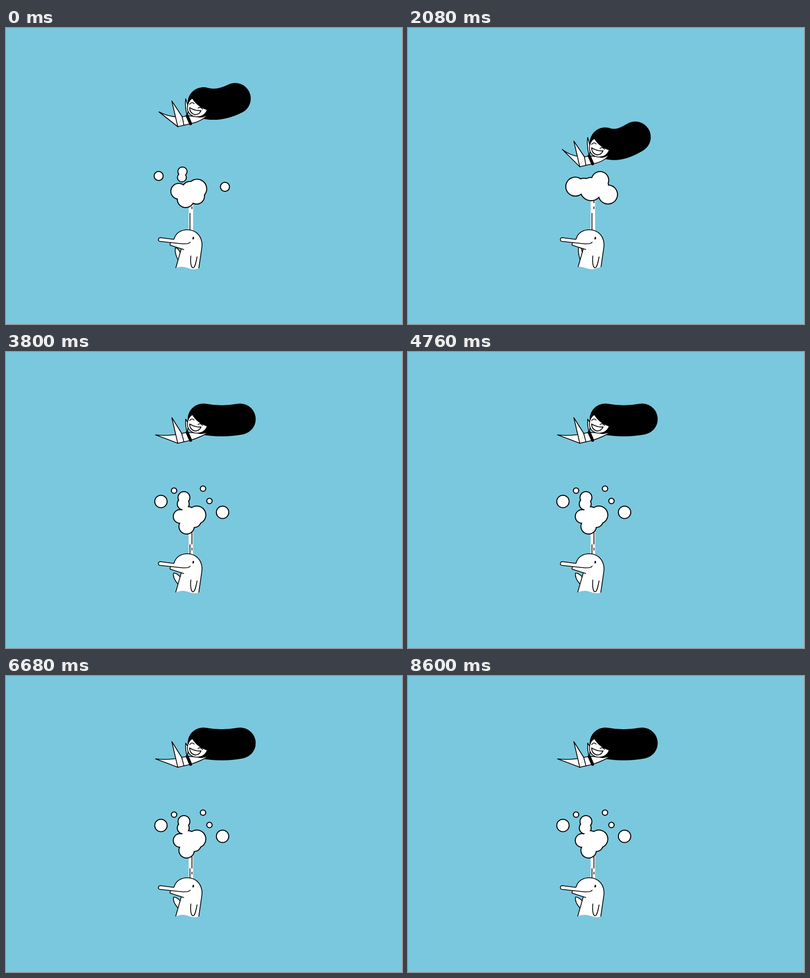
Write an HTML page with a canvas that moves like this. It is 800 px wide and 600 px high and loops after 8640 ms.

```html
<!DOCTYPE html>
<html lang="en">
<head>
<meta charset="utf-8">
<title>Dolphin fountain</title>
<style>
  html, body { margin: 0; width: 100%; height: 100%; overflow: hidden; background: #7ac8de; }
  canvas { display: block; }
</style>
</head>
<body>
<canvas id="stage" width="800" height="600"></canvas>
<script>
const ctx = document.getElementById('stage').getContext('2d');
const STEP = 40, LOOP = 8640, BEAT = 480, TAU = Math.PI * 2;
const SKY = '#7ac8de', INK = '#000', WHITE = '#fff';

// One value per step of the bounce.
const DROP = [15.5, 35, 57, 79, 97, 109, 112, 102, 74.5, 28, -5, 0];
const SWING = [0, -.4, -.6, -.6, -.4, .1, 1.1, 2.3, 3, 2.6, 1.75, 1];

// Points of the swimmer, from trailing up (first) to trailing down (last).
const NAMES = ['foot1', 'shin1', 'hip', 'calf1', 'foot2', 'shin2', 'waist', 'calf2', 'seat',
  'chest', 'rib', 'hand1', 'elbow1', 'hand2', 'elbow2', 'hairEnd', 'hairMid'];
const POSES = [
  [309,154.5, 330,166, 347,184.5, 328,169.5, 335,132.5, 346,149, 356,164.5, 341,158.5, 347,184.5,
   366,162.5, 373,178.5, 363,128, 361,143, 410,158.5, 396,174, 463,127.5, 428,145],
  [302,168, 330,171, 347,185, 324,176, 335,133, 345,149, 355,165, 341,159, 347,185,
   366,163, 373,179, 363,136, 362,150, 414,160, 395,172, 473,136, 436,143],
  [297,181, 322,172, 348,183, 322,183, 318,144, 338,149, 354,163, 334,162, 348,181,
   366,161, 373,177, 359,138, 359,150, 413,168, 396,173, 475,150, 436,148],
  [322,192.5, 331,171, 346,175.5, 335,180, 317,187.5, 326,162, 352,157.5, 332,169, 351,161,
   366,153.5, 374,168.5, 348,143.5, 357,141.5, 395,188.5, 386,172, 432,222.5, 414,179.5]
];

// Foam: x, y, radius when young, when full and when flying off.
const FOAM = [
  [[349,331,16], [327,312,22.5], [313,303,12.5]],
  [[385,341,16], [423,334,22.5], [437.5,325,12.5]],
  [[386,326,19.5], [390,291,15.5], [398,277,5.5]],
  [[363,347,17], [348,295,16], [339.5,281,5.5]],
  [[372,328,17], [405,318,15], [411,302,5.5]],
  [[370,335,16], [368.5,307,20], [359.5,295,12]],
  [[368,338,15], [366,323,21], [358,308,12]],
  [[370,332,18], [370,324,26], [368,330,12]],
  [[378,332,12], [414,304,6], [417,296,-1]]
];

const mix = (a, b, u) => a + (b - a) * u;
const clamp = (v, lo, hi) => Math.max(lo, Math.min(hi, v));

function spline(a, b, c, d, u) {
  return b + .5 * u * (c - a + u * (2 * a - 5 * b + 4 * c - d + u * (3 * (b - c) + d - a)));
}

function poseAt(s) {
  const i = clamp(Math.floor(s), 0, POSES.length - 2), u = s - i;
  const at = k => POSES[clamp(k, 0, POSES.length - 1)];
  const value = j => s < 0
    ? mix(POSES[0][j], POSES[1][j], s)
    : spline(at(i - 1)[j], at(i)[j], at(i + 1)[j], at(i + 2)[j], u);
  return Object.fromEntries(NAMES.map((name, k) => [name, value(2 * k) + ',' + value(2 * k + 1)]));
}

function shape(d, fill, line = 1.6) {
  const p = new Path2D(d);
  if (fill) { ctx.fillStyle = fill; ctx.fill(p); }
  if (line) { ctx.strokeStyle = INK; ctx.lineWidth = line; ctx.stroke(p); }
}

function disc(x, y, r, color) {
  if (r <= 0) return;
  ctx.fillStyle = color;
  ctx.beginPath();
  ctx.arc(x, y, r, 0, TAU);
  ctx.fill();
}

function swimmer(k) {
  const p = poseAt(SWING[k]);
  ctx.save();
  ctx.translate(0, DROP[k]);

  shape(`M398.5,136 Q${p.hairMid} ${p.hairEnd}`, null, 63);
  shape(`M${p.hand1} Q${p.elbow1} ${p.chest} L369,146Z`, WHITE);
  shape(`M${p.foot1} Q${p.shin1} ${p.waist} L${p.hip} Q${p.calf1} ${p.foot1}Z`, WHITE);
  shape(`M${p.waist} L${p.chest} L${p.rib} L${p.hip}`, WHITE);
  shape(`M${p.chest} L${p.rib} Q${p.elbow2} ${p.hand2} Q395,168 386,164Z`, WHITE);
  shape(`M${p.foot2} Q${p.shin2} ${p.waist} L${p.seat} Q${p.calf2} ${p.foot2}Z`, WHITE, 0);
  shape(`M${p.waist} Q${p.shin2} ${p.foot2} Q${p.calf2} ${p.seat}`);

  const [hx, hy] = p.hip.split(',').map(Number);
  const [rx, ry] = p.rib.split(',').map(Number);
  shape(`M${p.waist} L${mix(hx, rx, .48)},${mix(hy, ry, .48)}`);
  shape(`M${p.chest} L${p.rib}`, null, 6);

  shape('M376.5,126.5 Q367,133 366.5,145 C366,157 375,164.5 386,164.5'
    + ' C396,164.5 404,159 406.5,150 Q387,144 376.5,126.5Z', WHITE);
  shape('M371,139 Q376,133 380,138 M388,147 Q393,143 397,149');
  shape('M371,146 Q383,153 394,152 Q390,161 381,160 Q371,157 371,146Z', WHITE, 1.8);
  ctx.restore();
}

function dashes(x, top, length, period) {
  ctx.fillStyle = INK;
  for (let y = top % period - period; y < 412; y += period) {
    const from = Math.max(y, 340), to = Math.min(y + length, 411);
    if (to > from) ctx.fillRect(x, from, 1.6, to - from);
  }
}

function jet(t) {
  const n = t / STEP;
  ctx.fillStyle = WHITE;
  ctx.fillRect(369, 340, 9, 71);
  dashes(370.8, 375 - 15 * n + 6000, 36, 60);
  dashes(374.8, 362 - 35 * n + 14000, 5, 140);
  dashes(374.8, 326 - 35 * n + 14000, 29, 140);
}

function bubble([young, full, flown], n) {
  const [a, b, u] = n < 0 ? [young, full, (n + 8) / 8] : [full, flown, n / 3];
  const [x, y, r] = a.map((v, i) => mix(v, b[i], u));
  return [x, y, r * clamp((n + 12) / 3.3, 0, 1)];
}

function foam(k) {
  const n = k - 8;
  const list = [n - 12, n, n + 12].filter(m => m >= -12 && m <= 8)
    .flatMap(m => FOAM.map(f => bubble(f, m)))
    .filter(b => b[2] > 2.5);
  for (const [x, y, r] of list) disc(x, y, r + 1, INK);
  for (const [x, y, r] of list) disc(x, y, r - 1, WHITE);
}

function dolphin(t) {
  const tipX = 340 + 7 * Math.cos(TAU * t / BEAT - 1.274);
  const tipY = 446 + (342 - tipX) * .65;
  shape(`M352,456 Q${tipX + 6},${tipY - 1} ${tipX},${tipY} Q${tipX - 2},${tipY + 10} 348,471`, WHITE);

  // The waterline drifts left under the body.
  const water = x => 486.5 - 2.5 * Math.cos(TAU * (x - 355 + t * .05) / 48);
  ctx.save();
  ctx.beginPath();
  ctx.moveTo(300, 400);
  ctx.lineTo(410, 400);
  for (let x = 410; x >= 300; x -= 2) ctx.lineTo(x, water(x));
  ctx.clip();
  shape('M342,490 L354,448 L332,440 L331,435 L339,428 C343,414 355,409 366,409'
    + ' C386,409 396,424 396,440 Q396,444 389,490Z', WHITE, 0);
  shape('M342,490 L354,448 M339,429 C343,414 355,409 366,409 C386,409 396,424 396,440 Q396,444 389,490');
  ctx.restore();

  shape('M333,435 Q329,440 334,441 L359,449', WHITE);
  shape('M339,428.5 L312,425 C307,425 306,432 311,432.5 L352,437 Q370,439 372,434', WHITE);
  shape('M373.5,462 C372,476 374,486 378,486 C382,486 384,474 386,464');
  ctx.fillStyle = INK;
  ctx.beginPath();
  ctx.ellipse(378.3, 426, 1.6, 2.7, .2, 0, TAU);
  ctx.fill();
}

function draw(now) {
  const t = Math.floor(now % LOOP / STEP) * STEP;
  const k = t % BEAT / STEP;
  ctx.fillStyle = SKY;
  ctx.fillRect(0, 0, 800, 600);
  ctx.lineJoin = ctx.lineCap = 'round';
  swimmer(k);
  jet(t);
  foam(k);
  dolphin(t);
}

const start = performance.now();
function tick() {
  draw(performance.now() - start);
  requestAnimationFrame(tick);
}
tick();
</script>
</body>
</html>
```
